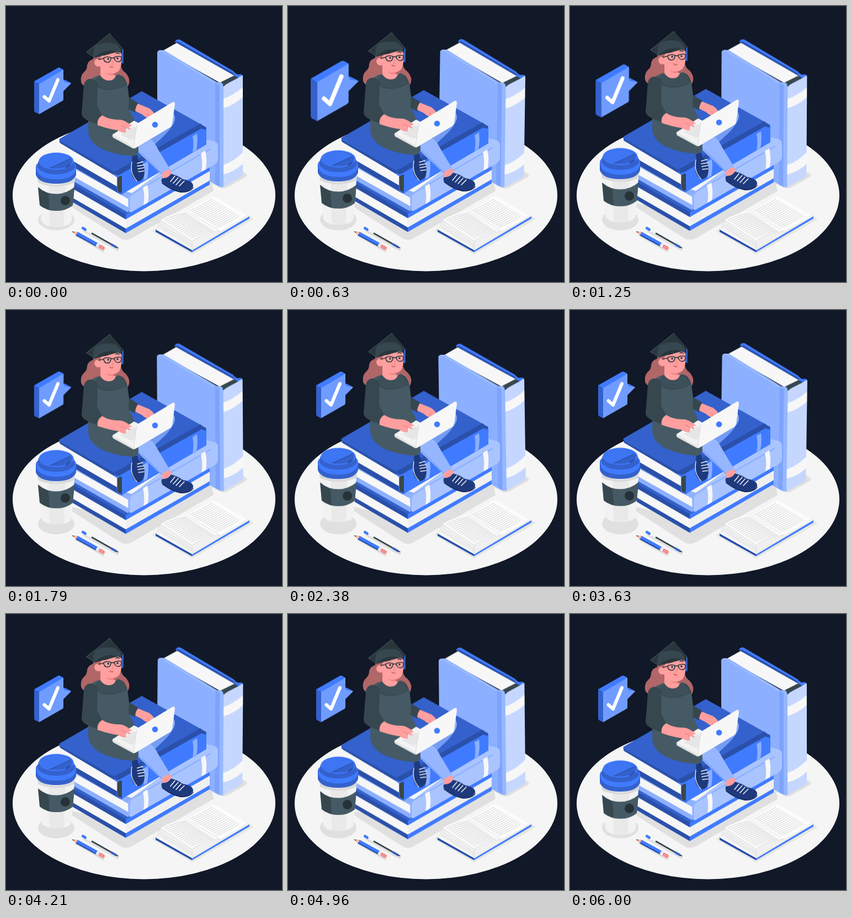
These frames come from a looping animation (500 by 500 pixels, 6040 ms). An HTML page:

```html
<!DOCTYPE html>
<html lang="en">
<head>
<meta charset="utf-8">
<title>Studying on books</title>
<style>
  html, body { margin: 0; width: 100%; height: 100%; overflow: hidden; background: #111827; }
  svg { display: block; width: 100%; height: 100%; }
  #tall { animation: sway 3020ms linear infinite; transform-origin: 352px 194px; }
  #stack { animation: lift 6040ms linear infinite; --rise: -10px; }
  #cup { animation: lift 6040ms linear infinite; --rise: -20px; }
  #bubble { animation: beat 6040ms linear infinite; transform-origin: 84.5px 153.5px; }
  @keyframes lift { 50% { transform: translateY(var(--rise)); } }
  @keyframes sway { 25% { transform: rotate(1deg); } 75% { transform: rotate(-1deg); } }
  @keyframes beat {
    0%, 30%, 40%, 60%, 100% { transform: scale(1); }
    10%, 50% { transform: scale(1.3); }
  }
  .blue { fill: #407bff; }
  .deep { fill: #3461cc; }
  .edge { fill: #2a50aa; }
  .soft { fill: #8cb0ff; }
  .pale { fill: #a9c4ff; }
  .page { fill: #f7f7f7; }
  .grey { fill: #e0e0e0; }
  .gown { fill: #455a64; }
  .dark { fill: #37474f; }
  .skin { fill: #ff9f9f; }
  .hair { fill: #b16668; }
  .navy { fill: #1e3a7d; }
  .line { fill: none; stroke-linecap: round; stroke-linejoin: round; }
</style>
</head>
<body>
<svg viewBox="0 0 500 500">
  <ellipse cx="250" cy="343" rx="238" ry="137.500" fill="#f5f5f5"/>

  <!-- ground shadows -->
  <g class="grey">
    <path d="M100 352L206 420Q217 427 229 420L376 335L369 300L217 380Z"/>
    <path d="M368 318L388 329Q395 332 402 328L434 310Q440 306 432 302L420 295Z"/>
    <ellipse cx="91" cy="387" rx="33" ry="19.500"/>
    <path d="M265 408L337 450L449 386L440 380L337 440L272 402Z" fill="#e6e6e6"/>
  </g>

  <g id="tall">
    <path class="blue" d="M306 65Q309 59 315 61L412 118Q417 124 421 124Q429 122 429 128L420 134L400 130Z"/>
    <path class="edge" d="M307 66Q309 63 313 65L411 121Q414 126 420 130L412 132Z"/>
    <path class="page" d="M284 81L309 67L415 127L391 141Z"/>
    <path class="dark" d="M389 138L413 126Q418 130 422 130L396 145Z"/>
    <path d="M393 147Q396 143 402 140L421 130Q426 126 429 126V306Q428 309 424 311L394 328Z" fill="#c5d7ff"/>
    <path class="page" d="M394 168Q410 163 429 147V165Q412 180 394 185Z"/>
    <path class="page" d="M394 288Q412 282 429 265V286Q412 301 394 305Z"/>
    <path class="soft" d="M274 86Q274 79 281 80L286 80L379 136Q383 139 388 138Q394 139 394 147V328H388L380 324L368 317L274 263Z"/>
    <path class="line" d="M275 84Q277 80 283 82L378 139Q383 143 389 141" stroke="#a3c0ff" stroke-width="1.500"/>
    <path d="M379 138Q383 142 387 142V327L379 323Z" fill="#7da3fb"/>
    <path d="M387 142Q391 138 394 146V328H387Z" fill="#96b7ff"/>
  </g>

  <g id="stack">
    <!-- bottom book -->
    <path class="edge" d="M108 340L217 403V411.500L108 348Z"/>
    <path class="blue" d="M217 403L369 316V323.500L217 411.500Z"/>
    <path class="page" d="M108 323L217 386V403L108 340Z"/>
    <path d="M217 386L369 298V316L217 403Z" fill="#f0f0f0"/>
    <path class="deep" d="M108 308L217 366L369 280V293L217 380L108 317Z"/>
    <path class="edge" d="M108 315L217 378V386.500L108 323.500Z"/>
    <path class="blue" d="M217 378L369 290.500V299L217 386.500Z"/>

    <!-- middle book -->
    <path class="page" d="M110 284L228 345L223 368L110 304Z"/>
    <path class="soft" d="M110 302L222 365V374.500L110 310.500Z"/>
    <path class="soft" d="M110 281L200 331L228 339L222 350L110 287Z"/>
    <path class="pale" d="M221 350Q222 343 228 339L360 241L377 245Q384 247 384 254V277Q384 283 378 287L228 373Q222 375 222 368Z"/>
    <path class="line" d="M223 369V350Q223 344 229 340L370 259" stroke="#8cb0ff" stroke-width="2.500"/>
    <path class="page" d="M248 329L256 324Q260 340 257 356L249 361Q252 344 248 329Z"/>
    <path class="page" d="M353 267L361 262Q365 278 362 296L354 300Q357 283 353 267Z"/>

    <!-- top book -->
    <path class="edge" d="M118 276L204 328L212 341Q206 342 200 337L118 289Z"/>
    <path class="page" d="M112 254L203 306V328L118 279Z"/>
    <path class="edge" d="M97 242L204 300L200 309L99 249Q96 247 97 242Z"/>
    <path class="deep" d="M98 240L244 155.500Q246 153.500 248 155.500L358 217L205 302Q201 304 197 301L98 245Q95 242 98 240Z"/>
    <path class="blue" d="M196 304Q196 298 204 296L352 213Q357 218 362 219Q364 222 363 228V251L212 340Q203 342 201 334V310Q197 309 196 304Z"/>
    <path class="edge" d="M196 303Q196 298 204 296L352 213Q357 218 362 219L362 224Q358 224 354 222L207 305Q200 309 196 303Z"/>
    <path class="dark" d="M202 311Q206 307 210 308V338Q205 340 202 334Z"/>
    <path class="soft" d="M338 236L346 231Q348 246 345 261L338 265Q341 250 338 236Z"/>
    <path class="soft" d="M249 286L257 281.500Q259 296 256 312L249 316Q252 301 249 286Z"/>

    <!-- legs and shoes -->
    <path class="soft" d="M295 187Q309 196 305 209Q301 222 270 250L245 262L232 256Z"/>
    <path d="M258 243L299 219Q294 230 270 249Z" fill="#749cf5"/>
    <path class="navy" d="M228 273Q234 268 239 271Q238 280 244 281Q251 288 251 300Q250 317 239 318Q230 315 227 303Q230 288 228 273Z"/>
    <path class="line" d="M228 283Q224 303 237 317" stroke="#ebebeb" stroke-width="1.300"/>
    <path class="line" d="M238 285L248 282M238 290L250 288M239 295L250 293M240 300L250 299" stroke="#f5f5f5" stroke-width="1.500"/>
    <path d="M237 262Q241 249 256 241L264 243Q271 250 274 257L298 297Q290 298 283 306L260 284Q244 270 237 262Z" fill="#96b6ff"/>
    <path class="line" d="M240 263Q252 272 283 305" stroke="#749cf5" stroke-width="1.200"/>
    <path class="skin" d="M282 304Q289 297 297 296L302 309Q292 317 284 314Z"/>
    <path class="navy" d="M283 312Q293 313 299 304Q309 306 321 314Q340 317 339 327Q332 339 316 338Q298 334 283 321Q280 315 283 312Z"/>
    <path class="line" d="M283 321Q304 337 322 337Q334 336 339 329" stroke="#15295c" stroke-width="1.500"/>
    <path class="line" d="M298 318L306 308M303 321L312 311M308 324L317 314M314 326L323 317" stroke="#f5f5f5" stroke-width="1.600"/>

    <!-- hair and gown -->
    <path class="hair" d="M161 95Q149 98 147 107Q147 115 142 119Q134 126 136 138Q139 147 150 145L214 151Q225 145 223 132Q220 123 213 118Q207 112 208 101Q185 83 161 95Z"/>
    <path class="gown" d="M152 135Q160 126 174 125Q187 130 204 124Q217 129 220 143L223 166L239 176L234 193L223 187L238 218L240 263Q238 270 230 272Q198 270 174 259Q149 246 149 225V205Z"/>
    <path class="dark" d="M223 166L240 176Q236 183 234 193L222 187Z"/>
    <path class="dark" d="M151 132Q161 131 166 139L165 181L174 198Q165 203 165 214Q142 207 138 199Q136 196 138 183L141 143Q143 134 151 132Z"/>
    <path class="line" d="M164 140Q168 151 184 151Q205 151 218 141M210 128Q216 133 218 143" stroke="#37474f" stroke-width="1.800"/>
    <path class="dark" d="M164 139Q159 130 174 125Q183 138 204 124Q217 127 217 140Q202 150 181 150Q168 149 164 139Z" opacity=".55"/>

    <!-- head -->
    <path class="skin" d="M171 108L205 106Q204 122 191 123L199 126Q196 136 184 135Q175 133 171 126Z"/>
    <path d="M181 121Q188 124 194 122L196 125Q187 127 181 121Z" fill="#ee8582"/>
    <path class="skin" d="M170 84Q188 75 209 84Q212 103 205 117Q197 125 183 121Q174 117 172 109Q162 112 160 103Q161 94 169 96Z"/>
    <path class="hair" d="M158 97Q157 84 170 79Q192 73 209 86Q192 80 180 85Q171 89 170 98Q163 93 158 97Z"/>
    <path d="M145 83L188 49L214 80L160 94Z" fill="#29373d"/>
    <path class="dark" d="M159 94Q156 77 164 71Q178 64 197 68Q209 73 209 86Q183 72 159 94Z"/>
    <path class="line" d="M146 84L188 50L213 80M146 84L159 92" stroke="#465961" stroke-width="1"/>
    <path class="line" d="M189 50L211 82" stroke="#1d292e" stroke-width="1"/>
    <path class="line" d="M211.500 81V103" stroke="#407bff" stroke-width="2"/>
    <g class="line" stroke="#263238" stroke-width="1.500">
      <path d="M177 94Q183 91 190 93.500Q190 102 184 102Q177 102 177 94ZM196 93Q203 90 209 92Q210 101 203 101Q197 101 196 93ZM190 95Q193 93 196 95M177 95L168 97"/>
      <path d="M179 89Q182 86.500 185 87.500M199 86Q202 84 205 86.500"/>
      <path d="M188 109Q191 112 194 110" stroke="#b64f55" stroke-width="1.200"/>
      <path d="M193 99Q196 106 191 106" stroke="#ee8582" stroke-width="1.200"/>
    </g>
    <g fill="#263238"><circle cx="185" cy="96" r="1.800"/><circle cx="202" cy="95" r="1.800"/></g>

    <!-- laptop and hands -->
    <path d="M193 233L232 208L276 231L233 258Q231 259 228 257L195 239Q192 237 193 233Z" fill="#e3e3e3"/>
    <path d="M193 233L232 208L274 230L232 256Z" fill="#f3f3f3"/>
    <path d="M207 233L232 218L251 228L228 243Z" fill="#e6e6e6"/>
    <path class="skin" d="M239 177Q251 182 259 185Q269 192 270 199Q268 203 263 201L257 203Q250 200 246 196L234 190Q235 182 239 177Z"/>
    <path class="skin" d="M174 198Q189 207 207 206Q216 207 228 217Q227 219 222 218L226 223Q223 225 218 221L217 229Q212 231 202 225Q190 224 166 216Q164 205 174 198Z"/>
    <path class="line" d="M217 221Q212 216 208 217M258 201Q260 198 256 195" stroke="#ee8582" stroke-width="1.200"/>
    <path d="M237 217Q237 213 241 211L302 174Q306 173 306 178L301 214Q300 218 297 220L235 257Q231 258 231 254Z" fill="#f7f7f7"/>
    <path class="line" d="M237 216L231 256" stroke="#dedede" stroke-width="1.200"/>
    <circle class="blue" cx="270" cy="215" r="5.300"/>
  </g>

  <g id="cup">
    <path d="M57 306H125L119 388Q117 400 91 400Q67 400 64 388Z" fill="#f2f2f2"/>
    <path d="M77 308H108L105 398Q91 401 79 398Z" fill="#e9e9e9"/>
    <path d="M57 312Q90 336 125 312L124 320Q91 334 58 320Z" fill="#d9d9d9"/>
    <path class="dark" d="M58 328Q73 341 92 341Q112 341 124 328L121 361Q109 371 91 371Q73 371 61 361Z"/>
    <path class="gown" d="M77 339Q104 345 124 328L121 361Q104 375 79 369Z"/>
    <circle cx="107.500" cy="352.500" r="8.500" fill="#263238"/>
    <path class="deep" d="M54 291Q55 285 60 284H121Q127 285 127 291V306Q121 322 91 322Q60 322 54 306Z"/>
    <path class="blue" d="M59 282L55 291Q54 302 64 308Q75 314 91 314Q108 314 118 308Q128 302 127 291L122 280Z"/>
    <path class="deep" d="M59 280L57 292Q66 305 91 305Q116 305 125 292L122 280Z"/>
    <ellipse class="blue" cx="91" cy="281" rx="31.500" ry="15.500"/>
    <ellipse class="deep" cx="91" cy="281" rx="29" ry="13.500"/>
    <path d="M62 281Q64 269 90 267.500Q109 268 117 276L79 293Q64 290 62 281Z" fill="#3d75f2"/>
    <path class="edge" d="M108 292Q112 287 118 286Q118 290 108 294Z"/>
    <path class="line" d="M80 294L116 277" stroke="#2a50aa" stroke-width="1.200"/>
  </g>

  <g id="bubble">
    <path class="blue" d="M51 136.500L94 112Q96 111 98 112L104 115.500V134L118 140L104 154L60 142Z"/>
    <path class="deep" d="M51 136.500L60 141.500V196L53 192.500Q51 191 51 189Z"/>
    <path d="M60 141.500L104 115.500V134L107 137L118 140L104 154V169Q104 171 102 172L60 196Z" fill="#709cff"/>
    <path class="blue" d="M104 133L107 134L118 139.500L106 138Z"/>
    <path class="line" d="M69.500 164.500L78 172L94 133.500" stroke="#fff" stroke-width="6"/>
  </g>

  <!-- open book -->
  <path class="blue" d="M271 406L337 443L441 381V385L337 446L271 409Z"/>
  <path class="edge" d="M271 405L337 442V446L271 409Z"/>
  <path d="M274 402L337 438V442L272 405Z" fill="#fafafa"/>
  <path d="M337 438L438 378V381L337 442Z" fill="#ebebeb"/>
  <path d="M274 402L281 387L388 407L434 378L439 380L337 440Z" fill="#f0f0f0"/>
  <path d="M327 372Q350 360 371 346Q376 343 381 347L436 379Q412 396 386 408Z" fill="#fcfcfc"/>
  <path d="M280 388Q301 374 328 372L387 408Q357 410 337 426Z" fill="#fafafa"/>
  <path class="line" d="M274 402L280 388L337 426V441M328 372L387 408Q358 410 337 426M279 395L337 432M277 399L337 436" stroke="#d9d9d9" stroke-width=".8"/>
  <path id="print" class="line" stroke="#cbcbcb" stroke-width=".9"/>

  <!-- pencil and pen -->
  <g class="line">
    <path d="M127 416L176 444M142 408L202 442" stroke="#e0e0e0" stroke-width="4"/>
    <path d="M128 412L168 434" stroke="#407bff" stroke-width="7" stroke-linecap="butt"/>
    <path d="M126.500 414.500L166.500 436.500" stroke="#2a50aa" stroke-width="2.200" stroke-linecap="butt"/>
    <path d="M164 432L170 435.500" stroke="#e8edf8" stroke-width="7.500" stroke-linecap="butt"/>
    <path d="M171 436L175.500 438.500" stroke="#f28f8f" stroke-width="7"/>
    <path d="M156 412L193 433" stroke="#37474f" stroke-width="2.800"/>
    <path d="M191 432L199 436.500" stroke="#3461cc" stroke-width="4"/>
    <path d="M200 437L203 438.500" stroke="#263238" stroke-width="1.500"/>
    <path d="M139.500 402.500L143.500 405" stroke="#407bff" stroke-width="5"/>
  </g>
  <path d="M119.500 408.500L130 409L126.500 415.500Z" fill="#ffb5a8"/>
  <path d="M119.500 408.500L123.500 408.700L122.500 411Z" fill="#263238"/>
</svg>
<script>
  // Ruled text on both pages of the open book
  let d = "";
  for (let i = 0; i < 15; i++) {
    const x = i * 3.55, y = i * 2.15;
    d += `M${333 + x} ${371 + y}q22 -9 40 -21.500`;
    d += `M${287 + x * 0.98} ${388 + y * 1.07}q17 -10 40 -13`;
  }
  document.getElementById("print").setAttribute("d", d);
</script>
</body>
</html>
```
